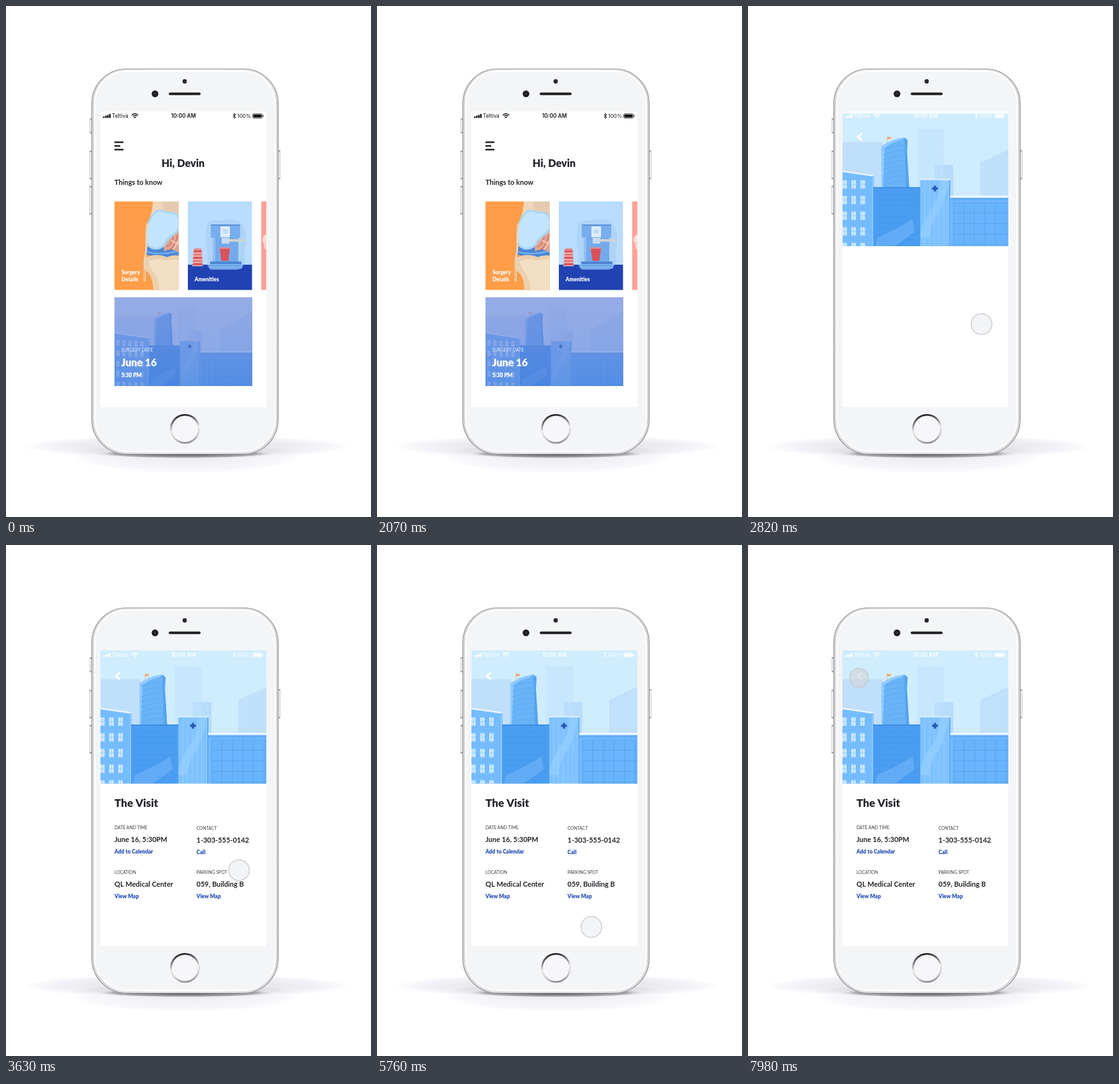
Write an HTML page with a canvas that moves like this. It is 572x800 px and loops after 8000 ms.

```html
<!DOCTYPE html>
<html lang="en">
<head>
<meta charset="utf-8">
<title>Surgery visit app</title>
<style>
html, body { margin: 0; width: 100%; height: 100%; overflow: hidden; background: #fff; }
canvas { display: block; width: 572px; height: 800px; }
</style>
</head>
<body>
<canvas id="stage" width="572" height="800"></canvas>
<script>
const ctx = document.getElementById('stage').getContext('2d');
const LOOP = 8000;
const INK = '#222429';
const LINK = '#2350b5';
const LATO = 'Lato, sans-serif';
const INTER = 'Inter, sans-serif';

const clamp = v => Math.max(0, Math.min(1, v));
const mix = (a, b, p) => a + (b - a) * p;
const span = (t, from, to) => clamp((t - from) / (to - from));
const easeInOut = u => u < .5 ? 4 * u ** 3 : 1 - 4 * (1 - u) ** 3;

function rect(x, y, w, h, color) {
  ctx.fillStyle = color;
  ctx.fillRect(x, y, w, h);
}

function rounded(x, y, w, h, r, fill, stroke, width = 1) {
  ctx.beginPath();
  ctx.roundRect(x, y, w, h, r);
  if (fill) { ctx.fillStyle = fill; ctx.fill(); }
  if (stroke) { ctx.strokeStyle = stroke; ctx.lineWidth = width; ctx.stroke(); }
}

function shape(d, fill) {
  ctx.fillStyle = fill;
  ctx.fill(new Path2D(d));
}

function line(d, color, width = 1) {
  ctx.strokeStyle = color;
  ctx.lineWidth = width;
  ctx.stroke(new Path2D(d));
}

function disc(x, y, r, color) {
  ctx.beginPath();
  ctx.arc(x, y, r, 0, Math.PI * 2);
  ctx.fillStyle = color;
  ctx.fill();
}

function ring(x, y, r, color, width) {
  ctx.beginPath();
  ctx.arc(x, y, r, 0, Math.PI * 2);
  ctx.strokeStyle = color;
  ctx.lineWidth = width;
  ctx.stroke();
}

function text(str, x, y, size, weight, color, align = 'left', family = LATO) {
  ctx.font = `${weight} ${size}px ${family}`;
  ctx.textAlign = align;
  ctx.fillStyle = color;
  ctx.fillText(str, x, y);
}

function gradient(x0, y0, x1, y1, ...colors) {
  const g = ctx.createLinearGradient(x0, y0, x1, y1);
  colors.forEach((c, i) => g.addColorStop(i / (colors.length - 1), c));
  return g;
}

function clipped(x, y, w, h, draw) {
  ctx.save();
  ctx.beginPath();
  ctx.rect(x, y, w, h);
  ctx.clip();
  draw();
  ctx.restore();
}

function faded(alpha, draw) {
  if (alpha <= 0) return;
  ctx.save();
  ctx.globalAlpha *= alpha;
  draw();
  ctx.restore();
}

function glow(x, y, rx, ry, inner, mid) {
  ctx.save();
  ctx.translate(x, y);
  ctx.scale(rx, ry);
  const g = ctx.createRadialGradient(0, 0, 0, 0, 0, 1);
  g.addColorStop(0, inner);
  g.addColorStop(.8, mid);
  g.addColorStop(1, 'rgba(240,240,248,0)');
  disc(0, 0, 1, g);
  ctx.restore();
}

function drawPhone() {
  glow(283, 690, 258, 19, 'rgba(205,205,212,.7)', 'rgba(240,240,246,.9)');
  glow(283, 706, 178, 25, 'rgba(222,222,230,.5)', 'rgba(245,245,250,.8)');
  glow(281, 697, 180, 12, 'rgba(150,150,155,.7)', 'rgba(215,215,220,.45)');
  glow(281, 701, 140, 7, 'rgba(50,50,54,.85)', 'rgba(110,110,115,.5)');

  for (const [x, y, h] of [[131.5, 176, 23], [131, 227, 44], [131, 282, 44], [425.5, 226, 45]]) {
    rounded(x, y, 4, h, 1.2, '#eeeef0', '#c4c4c7', .8);
    rect(x, y, 4, 1.5, '#87878a');
    rect(x, y + h - 1.5, 4, 1.5, '#87878a');
  }

  rounded(134.5, 98.5, 292, 603, 54, gradient(134, 0, 427, 0, '#d9d9dc', '#efeff1', '#efeff1', '#d9d9dc'), '#939396', 1.2);
  for (const x of [135, 420]) {
    rect(x, 146, 6, 8, '#d2d2d5');
    rect(x, 646, 6, 8, '#d2d2d5');
  }
  rounded(139, 102, 283, 595, 50, '#f4f5f7', '#fff', 2);

  disc(280, 118, 3.4, '#29292b');
  disc(233.5, 137.5, 5.2, '#1c1c1f');
  disc(233.5, 137.5, 2, '#34343a');
  rounded(255, 135.5, 50, 4, 2, '#1f1f21');

  disc(280.5, 662, 21.7, '#f7f7f9');
  ring(280.5, 662, 21.9, gradient(276, 639, 285, 685, '#1c1c1e', '#77777a', '#e9e9ea', '#d0d0d2', '#8a8a8d'), 2.8);
  rect(148, 165, 260, 463, '#fff');
}

function drawStatus(color) {
  for (let i = 0; i < 4; i++) rounded(152 + i * 3.2, 173 - i * 1.3, 2.4, 2.2 + i * 1.3, .5, color);
  text('Teltiva', 166, 175, 8.3, 400, color, 'left', INTER);
  ctx.strokeStyle = color;
  ctx.lineWidth = 1.5;
  for (const r of [6.5, 3.9]) {
    ctx.beginPath();
    ctx.arc(202, 175.3, r, -Math.PI * .77, -Math.PI * .23);
    ctx.stroke();
  }
  disc(202, 174.4, 1.2, color);
  text('10:00 AM', 278, 175, 8.4, 600, color, 'center', INTER);
  line('M355.5 169.8L360 174L357.7 176V168L360 170L355.5 174.2', color, .9);
  text('100%', 384, 175, 8.2, 400, color, 'right', INTER);
  rounded(386.5, 168.7, 15, 6.8, 1.6, null, color, .7);
  rounded(387.5, 169.7, 13, 4.8, .8, color);
  rect(402.5, 170.8, 1.2, 2.6, color);
}

function drawKnee() {
  clipped(170, 306, 100.5, 138.5, () => {
    rect(170, 306, 101, 139, '#ff9d49');
    shape('M230 306Q230 320 225 332L232 388H271V306Z', '#f0d5b8');
    shape('M246 306Q243 319 254 325Q264 328 271 335V306Z', '#e6cbb0');
    shape('M220 378Q244 371 271 377V391Q244 398 220 389Z', '#4a88d6');
    line('M221 385Q245 391 271 383', '#7fb6ef', 2);
    shape('M246 371Q254 367 259 357L271 350V387Q260 377 248 384Z', '#e0a592');
    line('M251 377Q260 374 262 360M255 383Q266 376 269 358', '#cf655c', 1.3);
    line('M259 367L271 373M262 382L271 366', '#f2c9b0', 2);
    shape('M218 394Q236 386 252 393Q263 389 271 391V445H231Q230 424 222 417Q211 408 218 394Z', '#ead0ae');
    shape('M223 400Q240 393 250 399Q262 396 271 397V445H241Q239 424 229 414Z', '#f3dfc4');
    shape('M236 320C243 316 250 323 258 322C274 322 278 340 270 353C263 361 257 362 252 371C244 385 227 384 221 374C214 360 221 328 236 320Z', '#a9d5f5');
    shape('M237 323C243 319 251 326 257 325C271 325 275 340 267 351C259 359 254 360 249 369C241 381 229 381 223 372C217 358 224 330 237 323Z', '#c2e5fd');
    line('M222 340C217 357 222 373 218 391C214 409 219 414 217 431', '#f1d3a9', 3.5);
    line('M219 345C216 360 220 375 216 391C213 409 218 414 217 428', '#dd9678', .9);
  });
  text('Surgery', 181, 420, 8.3, 900, '#fff');
  text('Details', 181, 431, 8.3, 900, '#fff');
}

function cup(x, y, w, h) {
  shape(`M${x} ${y}h${w}l${-w * .16} ${h}h${-w * .68}Z`, '#d9525a');
  rect(x - .7, y - 1, w + 1.4, 2, '#ef8a8a');
}

function drawAmenities() {
  clipped(285, 306, 100.5, 138.5, () => {
    rect(285, 306, 101, 139, '#b9dcff');
    rect(285, 405, 101, 40, '#2142b3');
    shape('M315 345C316 332 330 337 340 335C352 332 369 334 372 346C378 357 377 372 373 384C376 397 375 411 362 413H322C311 408 318 396 315 384C311 370 313 357 315 345Z', 'rgba(166,206,242,.6)');
    rect(327, 354, 37, 48, '#74aaeb');
    rounded(321, 342, 46, 21, 2, '#78aeee');
    rect(321, 342, 46, 2, '#5b92dd');
    rounded(336, 345, 15, 17, 1, '#dcecfd');
    disc(343.5, 353, 4, '#c0dcf8');
    rect(338, 363, 12, 9, '#c7dbf1');
    rect(349, 365, 27, 4, '#d0d2d0');
    rect(324, 364, 4, 36, '#8fc0f5');
    rect(320, 400, 49, 4, '#4f85d4');
    rect(319, 404, 51, 7, '#7bb4f2');
    rect(322, 406, 45, 1.3, '#5f95de');
    cup(335, 379, 16, 20);
    for (let i = 4; i >= 0; i--) {
      shape(`M${294.3 - i * .3} ${382 + i * 5}h${12 + i * .6}l1 5h${-14 - i * .6}Z`, i % 2 ? '#e77a7c' : '#d9575e');
      rect(293 - i * .3, 386 + i * 5, 14 + i * .6, 1.3, '#f7cac7');
    }
    rect(294.5, 379.5, 11.5, 3, '#e98989');
  });
  text('Amenities', 295.5, 431, 8.3, 900, '#fff');
}

function drawHome() {
  drawStatus('#111');
  rect(170, 212, 14, 2.5, INK);
  rect(170, 217.8, 9, 2.5, INK);
  rect(170, 223.6, 14, 2.5, INK);
  text('Hi, Devin', 277.5, 252, 16.2, 900, INK, 'center');
  text('Things to know', 170, 280, 11, 700, INK);
  drawKnee();
  drawAmenities();
  clipped(400, 306, 8, 138.5, () => {
    rect(400, 306, 8, 139, '#ffa198');
    disc(411, 366, 9, '#ffe0d8');
    disc(412, 375, 8, '#fbd0c8');
  });
}

// City scene in full-size coordinates: x 114..441, y 160..380
function drawCity() {
  rect(100, 155, 350, 230, '#cfedff');
  rect(114, 210, 97, 100, '#c0dffb');
  rect(265, 190, 42, 110, '#c6e6fd');
  rect(293, 246, 29, 60, '#b9dcfb');
  shape('M364 243L408 222V217L441 200V300H364Z', '#bfdffb');
  for (let x = 366; x < 441; x += 4) line(`M${x} ${245 - (x - 364) * .5}V298`, '#c8e7fe', .7);
  for (let x = 268; x < 306; x += 4) line(`M${x} 192V294`, '#cdebff', .7);

  line('M218 201V214', '#f7b08c', .9);
  shape('M218 201.5L224.5 202.5L223.5 205L218 205.5Z', '#f9a06b');
  shape('M209 217Q225 205 245 203L250 207L249 225L253 290H209Z', '#69b3f7');
  shape('M209 217Q225 205 245 203L240 207Q226 210 214 219L211 290H209Z', '#93cbff');
  shape('M245 203L250 207L249 225L253 290H248Z', '#56a2ee');
  for (let y = 222; y < 285; y += 8) line(`M211 ${y}Q228 ${y - 7} 249 ${y - 7}`, '#58a6f3', .7);

  shape('M114 250L148 256L197 263V380H114Z', '#75bcff');
  line('M114 250L148 256L197 263', '#eaf6ff', 2.5);
  for (let row = 0; row < 5; row++)
    for (let col = -2; col < 3; col++) {
      const x = 147.5 + col * 14.2, y = 270 + row * 24.6 + (col < 0 ? col : 0);
      rect(x, y, 7, 13, '#d0ebff');
      line(`M${x + 3.5} ${y}v13M${x} ${y + 6.5}h7`, '#93ccff', .9);
    }
  rect(194, 263, 3, 117, '#8cc8ff');

  rect(196, 281, 74, 99, '#4a9df1');
  rect(196, 281, 74, 1.5, '#388bdd');
  ctx.setLineDash([2, 1.5]);
  for (let y = 292; y < 378; y += 9) line(`M202 ${y}H265`, '#3e8ee0', .8);
  ctx.setLineDash([]);
  shape('M199 378L202 360Q231 348 258 331L261 351Q237 369 222 378Z', 'rgba(126,190,252,.45)');

  rect(270, 269, 47, 111, '#7ec2ff');
  shape('M302 269H315Q309 307 296 324Q286 339 284 360H270V350Q281 321 291 310Q300 295 302 269Z', 'rgba(168,214,255,.4)');
  for (let x = 277; x < 316; x += 7.5) line(`M${x} 271V380`, '#9dd2ff', .8);
  rect(269, 268, 48, 1.8, '#e0f2ff');
  rect(315.5, 270, 1.8, 110, '#5aa8f4');
  rect(291.3, 278.5, 3.4, 9, '#2656b5');
  rect(288.5, 281.3, 9, 3.4, '#2656b5');

  rect(317, 295, 124, 85, '#74baff');
  rect(317, 294, 124, 3.5, '#eef8ff');
  rect(317, 298, 124, 4, '#62adf7');
  rect(322, 305, 119, 75, '#68b4fd');
  for (let x = 322; x < 441; x += 16.5) line(`M${x} 305V380`, '#559de9', .7);
  for (let y = 305; y < 380; y += 16.5) line(`M322 ${y}H441`, '#559de9', .7);
}

function drawHero(p) {
  const x = mix(170, 148, p), y = mix(456, 165, p);
  const w = mix(216, 260, p), h = mix(139, 208.5, p);
  const scale = mix(.66, 1, p);
  const crossX = mix(288, 293, p), crossY = mix(533, 283, p);
  clipped(x, y, w, h, () => {
    ctx.save();
    ctx.translate(crossX, crossY);
    ctx.scale(scale, scale);
    ctx.translate(-293, -283);
    drawCity();
    ctx.restore();
    const tint = gradient(0, y, 0, y + h, 'rgba(114,128,212,.6)', 'rgba(98,126,214,.6)', 'rgba(72,118,212,.6)');
    faded(1 - p, () => rect(x, y, w, h, tint));
  });
}

function drawCardText() {
  text('SURGERY DATE', 180.5, 540.5, 6.9, 400, '#e9efff');
  text('June 16', 180.5, 563.5, 16, 900, '#fff');
  text('5:30 PM', 180.5, 581, 8.4, 900, '#fff');
}

function field(x, y, label, value, link) {
  text(label, x, y, 6.8, 400, '#3b3d42');
  text(value, x, y + 20, 11, 700, INK);
  text(link, x, y + 38, 8.3, 900, LINK);
}

function drawDetails() {
  text('The Visit', 170, 409.5, 17, 900, INK);
  field(170, 444.5, 'DATE AND TIME', 'June 16, 5:30PM', 'Add to Calendar');
  field(298.5, 445.5, 'CONTACT', '1-303-555-0142', 'Call');
  field(170, 515, 'LOCATION', 'QL Medical Center', 'View Map');
  field(298.5, 515, 'PARKING SPOT', '059, Building B', 'View Map');
}

const MOVES = [
  [3300, 4400, 359, 601],
  [4860, 5600, 336, 598],
  [6670, 7800, 174, 208],
];

function drawTouch(t) {
  let x = 366, y = 498;
  for (const [from, to, tx, ty] of MOVES) {
    const p = easeInOut(span(t, from, to));
    x = mix(x, tx, p);
    y = mix(y, ty, p);
  }
  const press = Math.sin(Math.PI * span(t, 2480, 2640)) + span(t, 7820, 7980);
  const r = 17 - 1.5 * press;
  const shade = 236 - 26 * press;
  faded(span(t, 2440, 2500), () => {
    disc(x, y, r, `rgba(${shade},${shade + 1},${shade + 5},.6)`);
    ring(x, y, r - .8, 'rgba(196,197,203,.75)', 1.6);
  });
}

function render(t) {
  rect(0, 0, 572, 800, '#fff');
  drawPhone();
  const open = easeInOut(span(t, 2520, 2870));
  clipped(148, 165, 260, 463, () => {
    faded(1 - span(t, 2520, 2680), drawHome);
    drawHero(open);
    faded(1 - span(t, 2520, 2620), drawCardText);
    faded(span(t, 2680, 2800), () => {
      drawStatus('#fff');
      line('M178.5 199.5L172.5 205L178.5 210.5', '#fff', 3);
    });
    const show = span(t, 2880, 3200);
    faded(show, () => {
      ctx.translate(0, 8 * (1 - show) ** 3);
      drawDetails();
    });
    drawTouch(t);
  });
}

function tick() {
  render(performance.now() % LOOP);
  requestAnimationFrame(tick);
}
tick();
</script>
</body>
</html>
```
